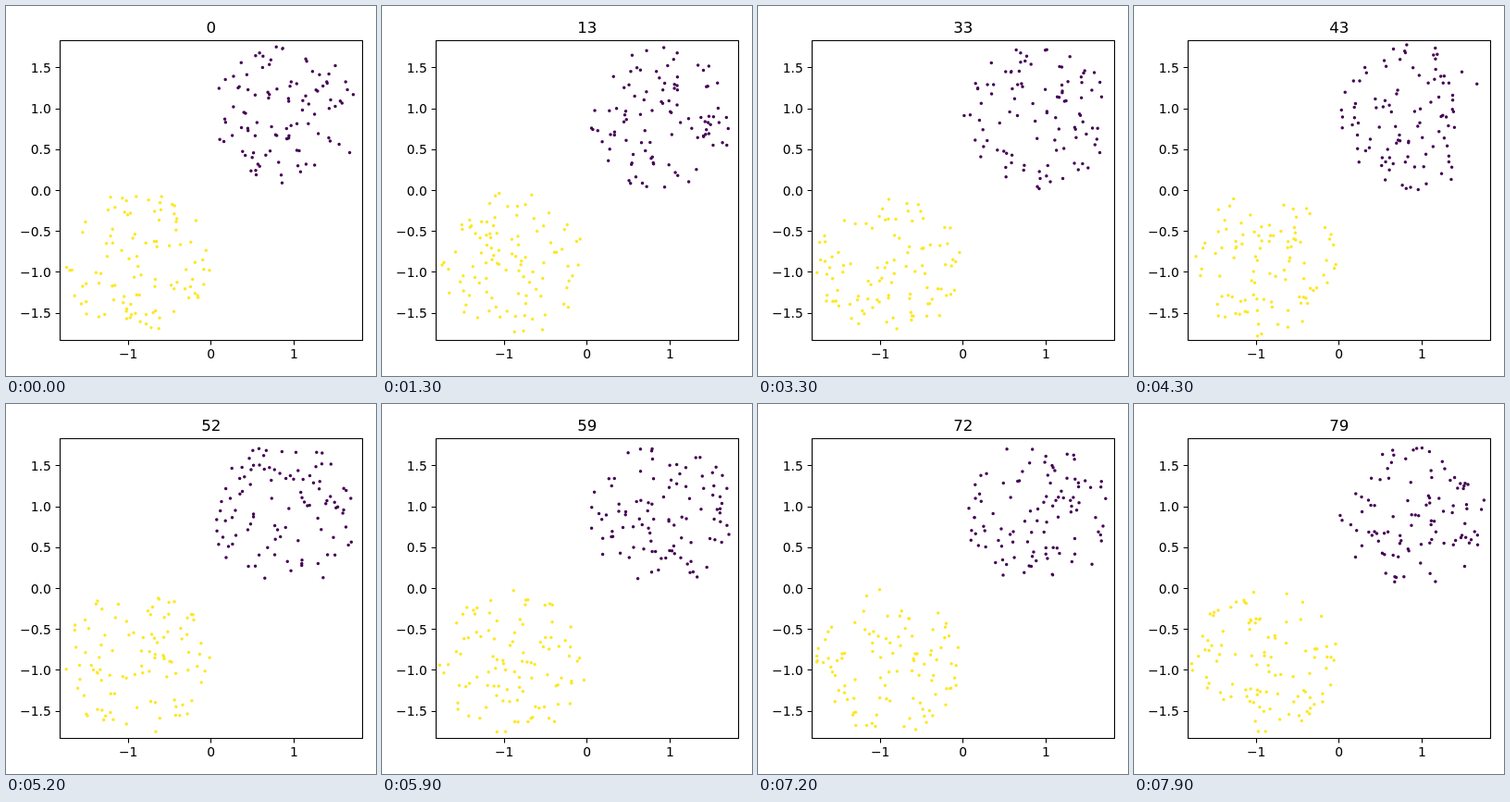
An HTML page that plays this animation: 400 px wide and 400 px high, repeating every 8 s.

```html
<!DOCTYPE html>
<html lang="en">
<head>
<meta charset="utf-8">
<title>Two clusters</title>
<style>
  html, body { margin: 0; width: 100%; height: 100%; overflow: hidden; background: #fff; }
  svg { display: block; width: 400px; height: 400px; }
  text { font: 13.89px "DejaVu Sans", sans-serif; text-anchor: middle; }
  .y { text-anchor: end; }
  #title { font-size: 16.67px; }
  path { fill: none; stroke: #000; stroke-width: 1.11; }
  .dots { stroke-width: 3.5; stroke-linecap: round; }
</style>
</head>
<body>
<svg viewBox="0 0 400 400">
  <path class="dots" id="upper" style="stroke:#440154"/>
  <path class="dots" id="lower" style="stroke:#fde725"/>
  <path id="axes"/>
  <g id="labels"></g>
  <text id="title" x="221.75" y="29"></text>
</svg>
<script>
const $ = id => document.getElementById(id);
const px = x => 221.75 + 89.6 * x;
const py = y => 199.5 - 88.45 * y;
const snap = v => Math.floor(v) + 0.5;
const FRAMES = 80, STEP = 100, COUNT = 100;
const CENTER = 0.895, RADIUS = 0.89;

function drawAxes() {
  let d = 'M58.5 37.5H385.5V361.5H58.5Z', labels = '';
  const sign = (v, digits) => v.toFixed(digits).replace('-', '\u2212');
  for (let x = -1; x <= 1; x++) {
    d += `M${snap(px(x))} 361.5v4.9`;
    labels += `<text x="${px(x)}" y="381.3">${sign(x, 0)}</text>`;
  }
  for (let y = -1.5; y <= 1.5; y += 0.5) {
    d += `M58.5 ${snap(py(y))}h-4.9`;
    labels += `<text class="y" x="48.8" y="${py(y) + 5.2}">${sign(y, 1)}</text>`;
  }
  $('axes').setAttribute('d', d);
  $('labels').innerHTML = labels;
}

function seeded(seed) {
  return () => {
    seed = (seed + 0x6d2b79f5) | 0;
    let t = Math.imul(seed ^ (seed >>> 15), 1 | seed);
    t = (t + Math.imul(t ^ (t >>> 7), 61 | t)) ^ t;
    return ((t ^ (t >>> 14)) >>> 0) / 4294967296;
  };
}

// Points spread evenly over a disc
function disc(center, random) {
  let d = '';
  for (let i = 0; i < COUNT; i++) {
    const r = RADIUS * Math.sqrt(random()), a = 2 * Math.PI * random();
    const x = px(center + r * Math.cos(a)), y = py(center + r * Math.sin(a));
    d += `M${x.toFixed(2)} ${y.toFixed(2)}h0`;
  }
  return d;
}

let shown = -1;
function draw(now) {
  const n = Math.floor(now / STEP) % FRAMES;
  if (n !== shown) {
    shown = n;
    const random = seeded(n * 7919 + 17);
    $('upper').setAttribute('d', disc(CENTER, random));
    $('lower').setAttribute('d', disc(-CENTER, random));
    $('title').textContent = n;
  }
  requestAnimationFrame(tick);
}

const start = performance.now();
const tick = () => draw(performance.now() - start);
drawAxes();
tick();
</script>
</body>
</html>
```
